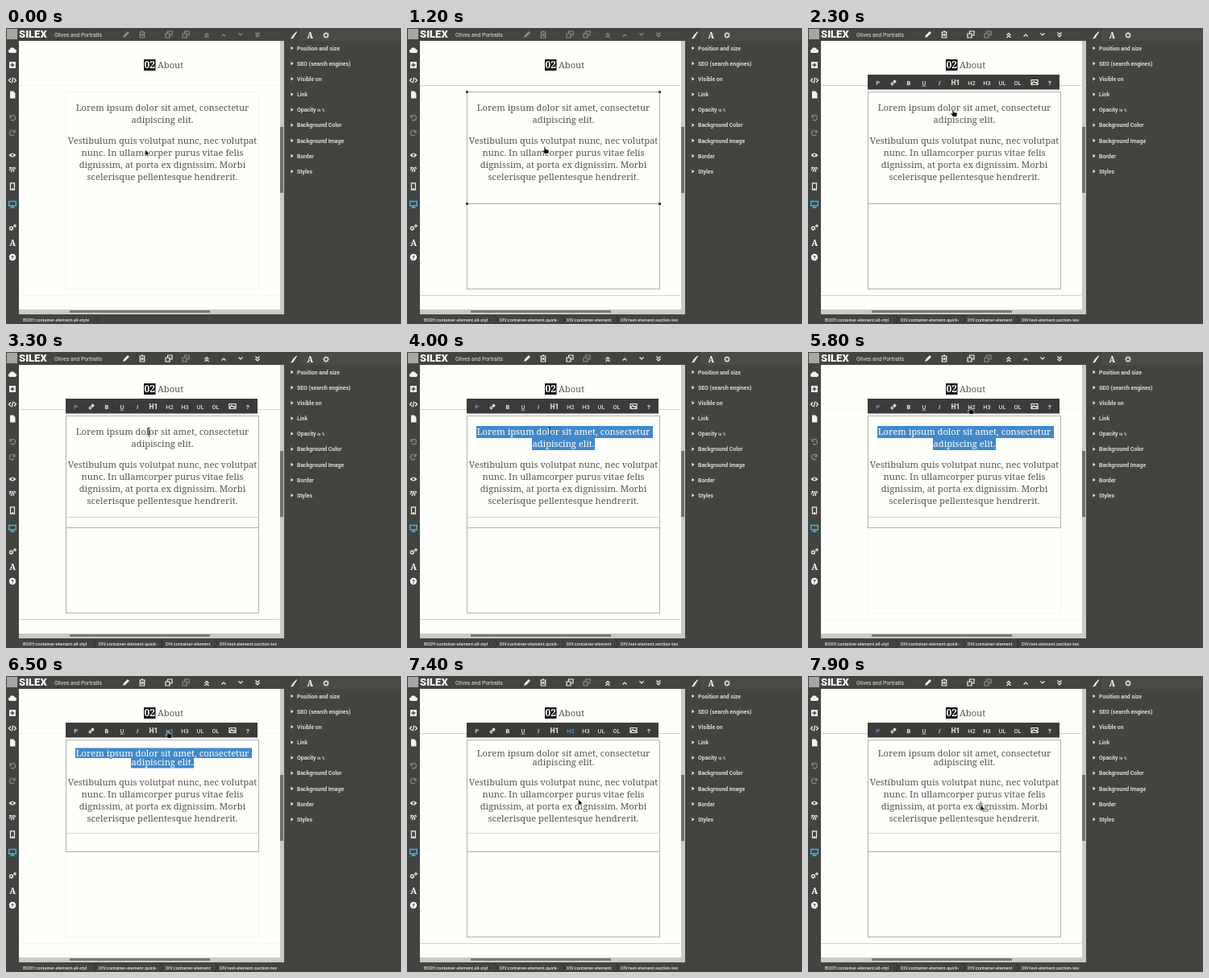
Animation of 490x368 px, one loop 8 s. Source, as an HTML page:

```html
<!DOCTYPE html>
<html lang="en">
<head>
<meta charset="utf-8">
<title>Website builder</title>
<style>
html, body { margin: 0; width: 100%; height: 100%; overflow: hidden; background: #434340; }
svg { display: block; width: 490px; height: 368px; }
text { font-family: Roboto, sans-serif; fill: #fff; }
.page text { font: 11.15px "Noto Serif", serif; fill: #555553; text-anchor: middle; }
.page .selected text { fill: #fff; }
.icon { fill: none; stroke: #f2f2ef; stroke-width: 1.2; }
.solid { fill: #f2f2ef; stroke: none; }
.dim { opacity: .42; }
.bar text { font-size: 7.4px; font-weight: 500; fill: #dededb; text-anchor: middle; }
.bar .active { fill: #6598e8; }
.panel text { font-size: 6.9px; font-weight: 700; fill: #d9d9d6; }
.crumbs text { font-size: 5.6px; font-weight: 500; fill: #e4e4e1; }
.edge { fill: none; stroke: #b2b2af; }
.soft { fill: none; stroke: #d4d4d1; }
.faint { fill: none; stroke: #f5f5f2; }
</style>
</head>
<body>
<svg id="stage" viewBox="0 0 490 368"></svg>
<script>
const LOOP = 8000;
const stage = document.getElementById('stage');

const rect = (x, y, w, h, fill) => `<rect x="${x}" y="${y}" width="${w}" height="${h}" fill="${fill}"/>`;
const frame = (x, y, w, h, cls) => `<rect x="${x}" y="${y}" width="${w}" height="${h}" class="${cls}"/>`;
const text = (x, y, s, extra = '') => `<text x="${x}" y="${y}" ${extra}>${s}</text>`;
const path = (d, cls, extra = '') => `<path d="${d}" class="${cls}" ${extra}/>`;
const icon = (x, y, d, cls = '') => path(d, 'icon ' + cls, `transform="translate(${x} ${y})"`);
// Shows its content during the listed start/end pairs.
const during = (times, content, cls = '') => `<g data-on="${times}" class="${cls}">${content}</g>`;

const circle = r => `M${-r} 0a${r} ${r} 0 1 0 ${2 * r} 0a${r} ${r} 0 1 0 ${-2 * r} 0z`;
const gear = r => Array.from({length: 8}, (_, i) => {
  const a = i * Math.PI / 4, c = Math.cos(a), s = Math.sin(a);
  return `M${c * r * .7} ${s * r * .7}L${c * r * 1.15} ${s * r * 1.15}`;
}).join('') + circle(r * .7);

const shapes = {
  pencil: 'M-4 4l1-3 5-5 2 2-5 5z',
  trash: 'M-3.5-3h7M-1-4h2M-2.7-3v7h5.4v-7M-.8-1v3M.8-1v3',
  copy: 'M-4-1h5v5h-5zM-1.5-1v-3h5.5v5h-3',
  up: 'M-2.5 1.5L0-1l2.5 2.5',
  down: 'M-2.5-1.5L0 1l2.5-2.5',
  brush: 'M4.5-4.5L.5 1.5-1.3 0 3-4.3zM-1.3 0l2 2q-2 3-5 2 2-1 3-4z',
  cloud: 'M-3 3a2.3 2.3 0 0 1-.5-4.5 3.5 3.5 0 0 1 6.5 0 2.3 2.3 0 0 1 .5 4.5z',
  code: 'M-2-2.5L-4.5 0-2 2.5M2-2.5L4.5 0 2 2.5M.8-3.5l-1.6 7',
  file: 'M-3-4.5h4l2.5 2.5v6.5h-6.5z',
  undo: 'M-3-3v3h3M-3 0a3.3 3.3 0 1 1 1 3',
  redo: 'M3-3v3h-3M3 0a3.3 3.3 0 1 0-1 3',
  eye: 'M-4.5 0q4.5-5 9 0-4.5 5-9 0z',
  phone: 'M-2.5-4.2h5v8.4h-5zM-1 2.8h2',
  screen: 'M-4.3-3.5h8.6v5.5h-8.6zM0 2v2.3M-2.5 4.3h5',
  image: 'M-4-3h8v6h-8zM-3.5 2l2.5-3 2 2 1-1 1.5 2',
  link: 'M-.5.5l2-2M0-1.5l1.5-1.5 1.5 1.5-2 2M0 1.5l-1.5 1.5-1.5-1.5 2-2'
};

function topBar() {
  const actions = icon(149, 8, shapes.pencil, 'solid') + icon(169, 8, shapes.trash) +
    icon(202, 8, shapes.copy) +
    icon(249, 9, 'M-2.5 0L0-2.5l2.5 2.5M-2.5 3L0 .5l2.5 2.5') + icon(270, 9, shapes.up) +
    icon(291, 8, shapes.down) + icon(312, 7, shapes.down + 'M-2.5 1.5L0 4l2.5-2.5');
  return rect(364, 0, 126, 16, '#4a4a47') +
    rect(1, 1, 13, 13, '#a6a6a3') +
    text(16, 12.3, 'SILEX', 'font-size="13" font-weight="800"') +
    text(60, 10.5, 'Olives and Portraits', 'font-size="6.8" style="fill:#e2e2df"') +
    during('0 1500', actions, 'dim') + during('1500 8000', actions) +
    icon(223, 8, shapes.copy, 'dim') +
    icon(357, 9, shapes.brush, 'solid') +
    text(373.5, 12.5, 'A', 'font-size="10" font-weight="700" style="font-family:\'Noto Serif\',serif"') +
    icon(397, 9, gear(3.3));
}

function leftBar() {
  return icon(8, 28, shapes.cloud, 'solid') +
    frame(4, 42, 8, 8, 'solid') + path('M8 43.5v5M5.5 46h5', '', 'stroke="#434340" stroke-width="1.3"') +
    icon(8, 65, shapes.code) + icon(8, 83, shapes.file, 'solid') +
    icon(8, 111, shapes.undo, 'dim') + icon(8, 130, shapes.redo, 'dim') +
    icon(8, 158, shapes.eye, 'solid') + '<circle cx="8" cy="158" r="1.4" fill="#434340"/>' +
    icon(8, 176, 'M-4 1l3-4M-2 3l3-6M1 3l1-4M2-3l2 2M-4-2l2-1') +
    icon(8, 197, shapes.phone) +
    path(shapes.screen, '', 'transform="translate(8 219)" fill="none" stroke="#42b5dc" stroke-width="1.4"') +
    icon(6.5, 249, gear(2.5)) + icon(11, 246, circle(1.2)) +
    text(4.2, 271, 'A', 'font-size="10.5" font-weight="700" style="font-family:\'Noto Serif\',serif"') +
    '<circle cx="8" cy="285" r="4.2" fill="#fff"/>' +
    text(6.2, 287.6, '?', 'font-size="7" font-weight="800" style="fill:#434340"');
}

function panel() {
  const rows = ['Position and size', 'SEO (search engines)', 'Visible on', 'Link',
    'Opacity <tspan font-size="5">in %</tspan>', 'Background Color', 'Background Image', 'Border', 'Styles'];
  return '<g class="panel">' + rows.map((s, i) => {
    const y = 25 + i * 19.15;
    return path(`M353.5 ${y - 2.3}l3 2.3-3 2.3z`, 'solid') + text(361, y + 2.7, s);
  }).join('') + '</g>';
}

function crumbs() {
  const divider = x => path(`M${x} 357l3 5.5-3 5.5`, '', 'fill="none" stroke="#2c2c2a"');
  return '<g class="crumbs">' +
    during('0 1200', text(21, 365, 'BODY.container-element.all-style') + divider(112)) +
    during('1200 8000',
      [[21, 'BODY.container-element.all-styl'], [115, 'DIV.container-element.quick-'],
        [198, 'DIV.container-element'], [265, 'DIV.text-element.section-tex']]
        .map(([x, s]) => text(x, 365, s)).join('') + [109, 192, 259].map(divider).join('')) + '</g>';
}

const heading = (y, gap) =>
  text(194, y, 'Lorem ipsum dolor sit amet, consectetur') + text(194, y + gap, 'adipiscing elit.');
const body = y => ['Vestibulum quis volutpat nunc, nec volutpat', 'nunc. In ullamcorper purus vitae felis',
  'dignissim, at porta ex dignissim. Morbi', 'scelerisque pellentesque hendrerit.']
  .map((s, i) => text(194, y + i * 15, s)).join('');

function selection(times, id, boxes, content) {
  const fills = boxes.map(b => rect(...b, '#4189cb')).join('');
  return `<clipPath id="${id}">${fills}</clipPath>` +
    during(times, fills + `<g clip-path="url(#${id})">${content}</g>`, 'selected');
}

function page() {
  const plain = heading(103, 15), tight = heading(99.5, 11.5);
  const sections = 'M16 71.5H339M16 332.5H339';
  const handles = [[74.5, 79.5], [313.5, 79.5], [74.5, 218.5], [313.5, 218.5]]
    .map(([x, y]) => rect(x - 1.5, y - 1.5, 3, 3, '#444442')).join('');
  return rect(16, 16, 329, 340, '#c9c9c6') + rect(16, 16, 324, 334, '#fefefb') +
    rect(340, 123, 4, 82, '#6f6f6c') + rect(79, 351, 174, 3, '#787875') +
    '<g class="page">' +
    path(sections, 'faint') + frame(74.5, 79.5, 239, 245, 'faint') +
    during('500 4600 7000 8000', path(sections, 'soft')) +
    during('1200 4600 7000 8000', frame(74.5, 79.5, 239, 245, 'edge')) +
    during('1200 8000', frame(74.5, 79.5, 239, 139, 'edge')) +
    during('1200 2300', handles) +
    during('2400 6500', path('M75 205.5H314', 'soft')) +
    during('6500 8000', path('M75 195.5H314', 'soft')) +
    rect(171, 39, 14.5, 14, '#111') +
    text(178.2, 50.3, '02', 'style="font-size:12px;font-weight:600;fill:#fff"') + text(204, 50, 'About') +
    during('0 6500', plain + body(144)) + during('6500 8000', tight + body(135.5)) +
    selection('3500 4000', 'word', [[158, 92, 30, 15]], plain) +
    selection('4000 6500', 'lines', [[86, 92, 219, 15], [155, 107, 78, 15]], plain) +
    selection('6500 7400', 'title', [[86, 89.5, 219, 12.5], [155, 102, 78, 12.5]], tight) +
    during('2400 3300', rect(86, 94, .8, 12, '#333')) +
    during('3300 3500', rect(177, 94, .8, 12, '#333')) +
    during('7500 8000', rect(214, 156, .8, 12, '#333')) + '</g>';
}

function textBar() {
  const labels = [[125, 'B', 'style="font-weight:800"'], [144, 'U', 'text-decoration="underline"'],
    [163, 'I', 'font-style="italic"'], [183, 'H1', 'style="font-size:8.6px;font-weight:800"'],
    [222, 'H3'], [241, 'UL'], [260, 'OL'], [300, '?', 'style="font-weight:800"']];
  const toggle = (x, s, on, off) =>
    during(on, text(x, 70.8, s, 'class="active"')) + during(off, text(x, 70.8, s));
  return during('2300 8000', rect(74, 58, 238, 18.5, '#3b3b39') +
    labels.map(([x, s, extra]) => text(x, 70.8, s, extra)).join('') +
    toggle(86.5, 'P', '2400 6500 7900 8000', '0 2400 6500 7900') +
    toggle(203, 'H2', '6500 7900', '0 6500 7900 8000') +
    icon(106, 68, shapes.link) + icon(281, 67.5, shapes.image), 'bar');
}

function cursors() {
  const style = 'fill="#111" stroke="#fff" stroke-width=".6"';
  return '<g id="pointer">' +
    during('0 1200 7000 8000', path('M-1-4v8l2-1.6 1.2 2.6 1.3-.6-1.2-2.5h2.4z', '', style)) +
    during('1200 2400 4600 7000',
      path('M-2-4q1-1 1.8 0v2.6l3.3.7q1.3.4 1.1 1.8l-.7 3.2h-5l-2.7-4q.4-1 2.2.3z', '', style)) +
    during('2400 4600', path('M-1.5-5h3M0-5v9M-1.5 4h3', '', 'fill="none" stroke="#333" stroke-width=".8"')) + '</g>';
}

stage.innerHTML = rect(0, 0, 490, 368, '#434340') + page() + textBar() + topBar() + leftBar() +
  panel() + crumbs() + cursors();

const moves = [[0, 173.5, 155], [1100, 173.5, 155], [1200, 172, 152], [1600, 183, 108], [1700, 183, 108],
  [1800, 181, 107], [2700, 181, 105], [2800, 178, 101], [2900, 178, 101], [3000, 177, 99],
  [4400, 177, 99], [4900, 160, 69], [5000, 160, 69], [5100, 162, 69], [5300, 183, 70], [5400, 183, 70],
  [5800, 202, 73], [6900, 202, 73], [7100, 212, 150], [7300, 212, 150], [7500, 215, 164], [8000, 215, 164]];
const timed = [...stage.querySelectorAll('[data-on]')]
  .map(node => ({node, times: node.dataset.on.split(' ').map(Number)}));
const pointer = document.getElementById('pointer');

function draw(now) {
  const t = Math.floor(now % LOOP / 100) * 100;
  for (const {node, times} of timed) {
    const shown = times.some((start, i) => i % 2 === 0 && t >= start && t < times[i + 1]);
    node.style.display = shown ? '' : 'none';
  }
  const next = moves.findIndex(m => m[0] > t);
  const [t0, x0, y0] = moves[next - 1], [t1, x1, y1] = moves[next];
  const k = (t - t0) / (t1 - t0);
  pointer.setAttribute('transform', `translate(${x0 + (x1 - x0) * k} ${y0 + (y1 - y0) * k})`);
  requestAnimationFrame(() => draw(performance.now() - begin));
}
const begin = performance.now();
draw(0);
</script>
</body>
</html>
```
